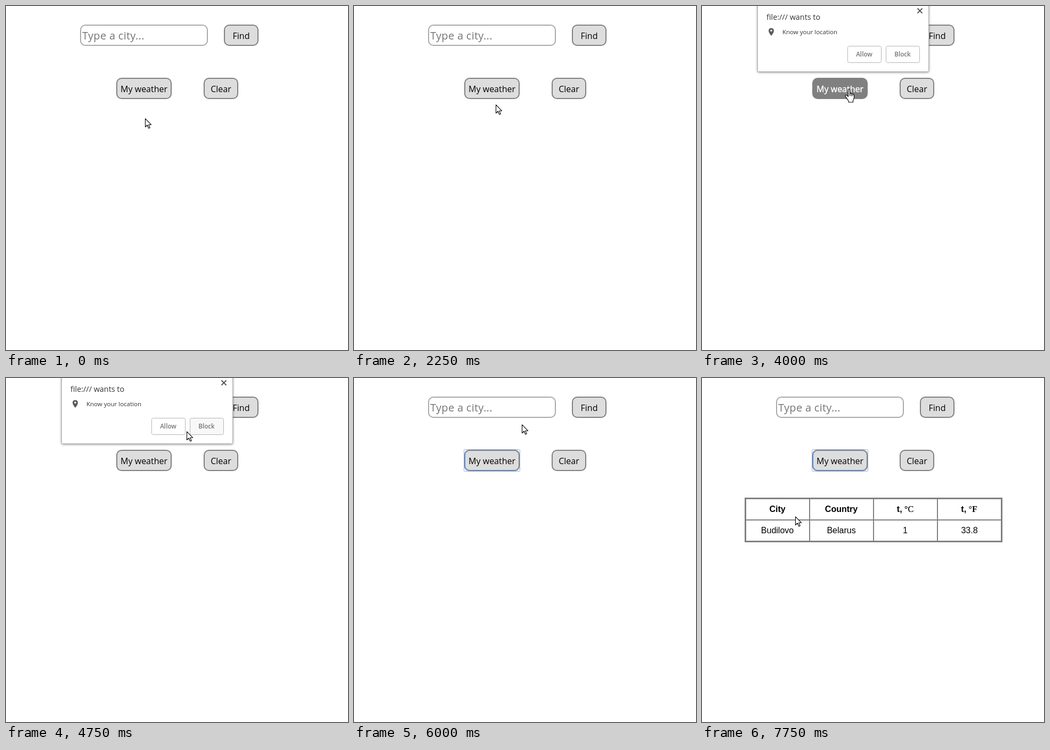
These frames come from a looping animation (642 px wide and 647 px high, 8 s). An HTML page:

```html
<!DOCTYPE html>
<html lang="en">
<head>
<meta charset="utf-8">
<title>Weather finder</title>
<style>
  html, body { margin: 0; width: 100%; height: 100%; overflow: hidden; background: #fff; }
  svg { display: block; width: 642px; height: 647px; }
  .ui { font: 16px "Comic Sans MS", "Open Sans", sans-serif; text-anchor: middle; }
  .box { fill: #ddd; stroke: gray; stroke-width: 2; }
  .hover .box { fill: gray; }
  .hover text { fill: #fff; stroke: #fff; stroke-width: .4; }
  .ring { fill: none; stroke: #4a86e8; }
  .grid { fill: none; stroke: gray; }
  .cells { font: 16px "Liberation Sans", Arial, sans-serif; text-anchor: middle; }
  .head { font-weight: bold; }
  .deg { font-family: "Liberation Serif", serif; }
  #popup { font-family: "Open Sans", sans-serif; }
  .sheet { fill: #fff; stroke: #b0b0b0; filter: drop-shadow(0 1px 2px rgba(0, 0, 0, .45)); }
  .choice { font-size: 11.7px; font-weight: 600; fill: #757575; text-anchor: middle; }
  .choice rect { fill: #fff; stroke: #b4b4b4; }
  .choice.over rect { fill: #f8f8f8; }
  .choice.down rect { fill: #e6e6e6; }
  .cursor { fill: #fff; stroke: #000; stroke-width: 1.1; stroke-linejoin: round; }
</style>
</head>
<body>
<svg viewBox="0 0 642 647">
  <g class="ui">
    <rect x="140" y="36" width="238" height="38" rx="9" fill="#fff" stroke="#a9a9a9" stroke-width="2"/>
    <text x="143" y="63" font-size="20" letter-spacing=".3" fill="#757575" text-anchor="start">Type a city...</text>
    <g>
      <rect class="box" x="410" y="36" width="63" height="38" rx="9"/>
      <text x="441.5" y="62">Find</text>
    </g>
    <g id="mine">
      <rect class="box" x="208" y="136" width="102" height="38" rx="9"/>
      <text x="259" y="162">My weather</text>
    </g>
    <g>
      <rect class="box" x="372" y="136" width="63" height="38" rx="9"/>
      <text x="403.5" y="162">Clear</text>
    </g>
    <g id="focus" class="ring">
      <rect x="206.5" y="134.5" width="105" height="41" rx="1" opacity=".6"/>
      <rect x="207.5" y="135.5" width="103" height="39" rx="7" opacity=".5"/>
    </g>
  </g>

  <g id="table">
    <rect class="grid" x="81.5" y="226.5" width="481" height="81" stroke-width="3"/>
    <path class="grid" d="M202 227v80M322 227v80M442 227v80M82 267h480" stroke-width="2"/>
    <g class="cells head">
      <text x="141.5" y="252">City</text>
      <text x="261.5" y="252">Country</text>
      <text x="381.5" y="252">t, <tspan class="deg" font-weight="400" stroke="#000" stroke-width=".2">°C</tspan></text>
      <text x="501.5" y="252">t, <tspan class="deg">°F</tspan></text>
    </g>
    <g class="cells">
      <text x="141.5" y="292">Budilovo</text>
      <text x="261.5" y="292">Belarus</text>
      <text x="381.5" y="292">1</text>
      <text x="502" y="292">33.8</text>
    </g>
  </g>

  <g id="popup">
    <rect class="sheet" x="104.5" y="-10.5" width="321" height="134" rx="2"/>
    <text x="121" y="26" font-size="14.4" fill="#333">file:/// wants to</text>
    <path d="M404.5 4.5l9 9m0-9l-9 9" stroke="#555" stroke-width="1.9"/>
    <path d="M130 56c-2.500-3.200-5-6.500-5-9.600a5 5 0 0 1 10 0c0 3.100-2.500 6.400-5 9.600Z" fill="#5a5a60"/>
    <circle cx="130" cy="46.300" r="1.800" fill="#fff"/>
    <text x="151" y="53" font-size="11.500" fill="#333">Know your location</text>
    <g id="allow">
      <rect x="273.500" y="75.500" width="63" height="31" rx="3"/>
      <text x="304.500" y="95" stroke="none">Allow</text>
    </g>
    <g id="block">
      <rect x="345.500" y="75.500" width="63" height="31" rx="3"/>
      <text x="376.500" y="95" stroke="none">Block</text>
    </g>
  </g>

  <g class="cursor">
    <path id="arrow" d="M.5.8V16.500L4.200 13 6.800 19 9.200 18 6.700 12.200H11.500Z"/>
    <path id="hand" d="M6.500 13.500V2.200c0-2 3-2 3 0V9c.3-1.400 2.800-1.200 2.800.5.4-1.200 2.600-1 2.600.7.5-1 2.600-.7 2.600 1.300v4.500c0 3-2 4.500-2 6v3H7.200v-2.500c-1.200-1.500-3-3.500-4.500-6.500-1.500-2.200-2.400-3-1.600-4 1.600-1.400 4 .5 5.400 2.500ZM9.500 9v4M12.300 9.500v4M14.900 10.500v3"/>
    <path id="beam" d="M.5.5h2.500l.5.5.5-.5h2.500M3.500 1v15M.5 16.500h2.500l.5-.5.5.5h2.500" fill="none"/>
  </g>
</svg>
<script>
  const LOOP = 8000;
  const $ = id => document.getElementById(id);

  // time, pointer shape, left, top
  const moves = [
    [0, 'arrow', 261, 211],
    [1000, 'arrow', 242, 3],
    [1250, 'arrow', 217, 30],
    [1500, 'beam', 229, 63],
    [1750, 'arrow', 274, 192],
    [2000, 'arrow', 274, 197],
    [2250, 'arrow', 266, 185],
    [2500, 'hand', 254, 160],
    [4000, 'hand', 268, 156],
    [4250, 'arrow', 347, 150],
    [4500, 'arrow', 364, 123],
    [4750, 'arrow', 339, 100],
    [5000, 'arrow', 319, 91],
    [5250, 'arrow', 315, 87],
    [7250, 'arrow', 274, 125],
    [7500, 'arrow', 157, 188],
    [7750, 'arrow', 175, 260]
  ];

  const show = (id, on) => { $(id).style.display = on ? '' : 'none'; };

  function draw(t) {
    const within = (a, b) => t >= a && t < b;
    const [, shape, x, y] = moves.findLast(m => m[0] <= t);
    for (const id of ['arrow', 'hand', 'beam']) show(id, id === shape);
    $(shape).setAttribute('transform', `translate(${x} ${y})`);

    $('mine').setAttribute('class', within(2500, 4250) ? 'hover' : '');
    show('popup', within(3250, 6000));
    show('focus', t >= 6000);
    show('table', t >= 6750);

    const allow = within(5750, 6000) ? ' down' : within(5000, 5750) ? ' over' : '';
    $('allow').setAttribute('class', 'choice' + allow);
    $('block').setAttribute('class', 'choice' + (within(4750, 5000) ? ' over' : ''));
  }

  function tick() {
    draw(performance.now() % LOOP);
    requestAnimationFrame(tick);
  }
  tick();
</script>
</body>
</html>
```
